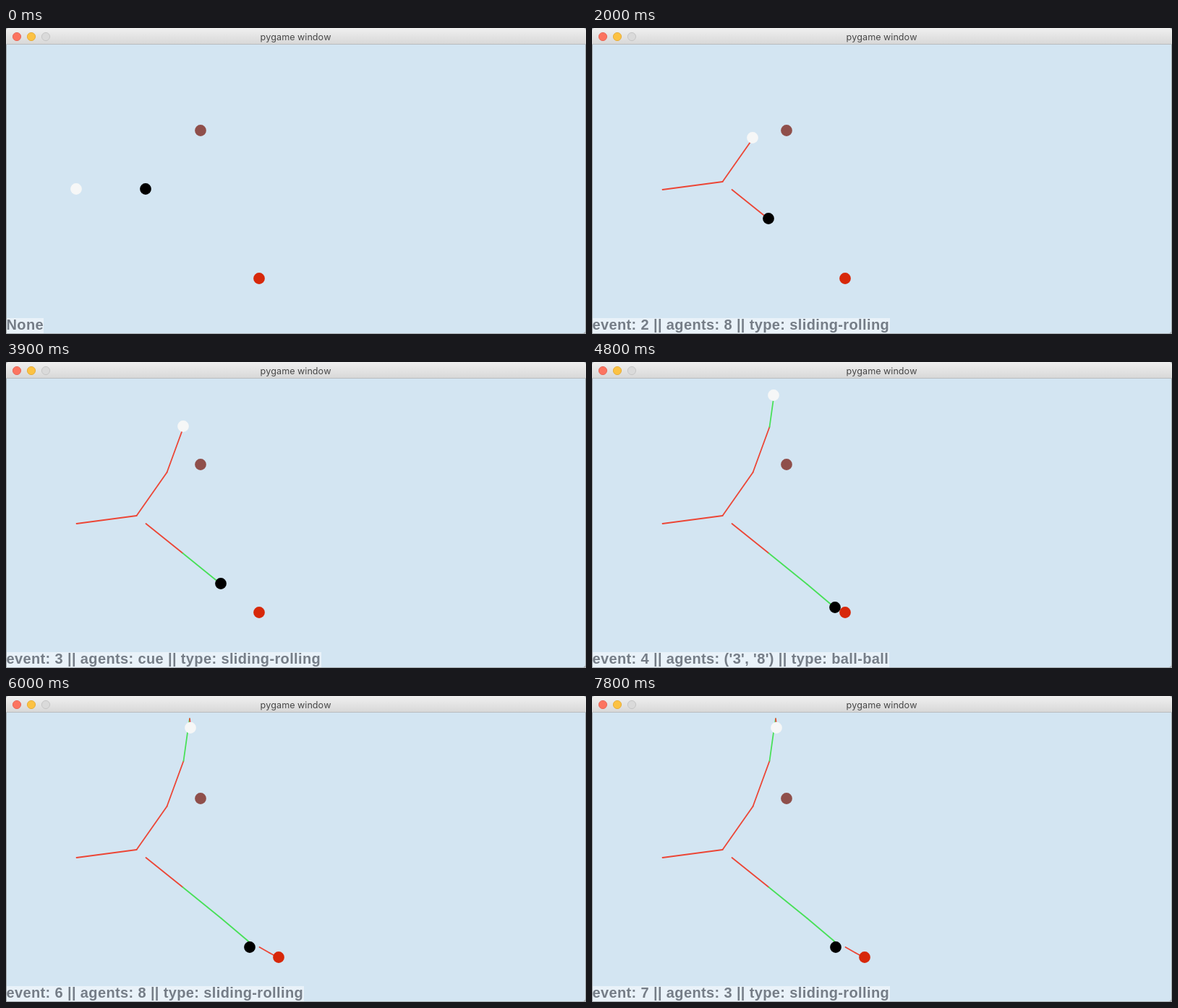
Animation of 802 by 424 pixels, one loop 8000 ms. Source, as an HTML page with a canvas:

```html
<!DOCTYPE html>
<html lang="en">
<head>
<meta charset="utf-8">
<title>pygame window</title>
<style>
  html, body { margin: 0; width: 100%; height: 100%; overflow: hidden; background: #a3a8ac; }
  canvas { display: block; }
</style>
</head>
<body>
<canvas width="802" height="424"></canvas>
<script>
const ctx = document.querySelector('canvas').getContext('2d');
const STEP = 1000, STEPS = 8;
const RED = '#ec4636', GREEN = '#48e058';

const captions = [
  'None',
  "event: 1 || agents: ('cue', '8') || type: ball-ball",
  'event: 2 || agents: 8 || type: sliding-rolling',
  'event: 3 || agents: cue || type: sliding-rolling',
  "event: 4 || agents: ('3', '8') || type: ball-ball",
  "event: 5 || agents: ('cue', 'T') || type: ball-rail",
  'event: 6 || agents: 8 || type: sliding-rolling',
  'event: 7 || agents: 3 || type: sliding-rolling',
];

// Each ball rests at path[0] until step `start`, then advances one point per step.
// `trail` gives the motion of each leg: s = sliding, r = rolling.
const balls = [
  { color: '#f6f7f7', start: 0, trail: 'sssrrs',
    path: [[97, 223], [180, 212], [222, 152], [245, 89], [251, 46], [253.5, 30.5], [255, 44]] },
  { color: '#000', start: 1, trail: 'srrss',
    path: [[193, 223], [244, 264], [297, 307], [336, 340], [336.5, 344], [337, 348]] },
  { color: '#d7280a', start: 4, trail: 'ss',
    path: [[350, 347], [364, 355], [377, 362]] },
  { color: '#8f4f4b', start: 0, trail: '', path: [[269, 142]] },
];

function disc(x, y, r, fill, stroke) {
  ctx.beginPath();
  ctx.arc(x, y, r, 0, 2 * Math.PI);
  ctx.fillStyle = fill;
  ctx.fill();
  if (stroke) {
    ctx.strokeStyle = stroke;
    ctx.lineWidth = 1;
    ctx.stroke();
  }
}

function drawWindow() {
  ctx.fillStyle = '#a3a8ac';
  ctx.fillRect(0, 0, 802, 424);
  ctx.beginPath();
  ctx.roundRect(1, 0, 800, 423, 4);
  ctx.fillStyle = '#d3e5f2';
  ctx.fill();

  const bar = ctx.createLinearGradient(0, 0, 0, 22);
  bar.addColorStop(0, '#f0f0f0');
  bar.addColorStop(1, '#d8d8d8');
  ctx.beginPath();
  ctx.roundRect(0, 0, 802, 22, [4, 4, 0, 0]);
  ctx.fillStyle = bar;
  ctx.fill();
  ctx.fillStyle = '#b9bcbe';
  ctx.fillRect(0, 22, 802, 1);

  disc(15, 12, 5.6, '#fc7460', '#e8695a');
  disc(35, 12, 5.6, '#fcc243', '#e6ae3c');
  disc(55, 12, 5.6, '#dadada', '#c6c6c6');

  ctx.font = '12.6px Inter, sans-serif';
  ctx.letterSpacing = '0px';
  ctx.textAlign = 'center';
  ctx.fillStyle = '#484848';
  ctx.fillText('pygame window', 400.5, 17);
}

function drawTrail({ path, start, trail }, step) {
  ctx.lineWidth = 1.8;
  ctx.lineCap = 'round';
  for (let i = 0; i < Math.min(step - start, trail.length); i++) {
    ctx.beginPath();
    ctx.moveTo(path[i][0] + 0.5, path[i][1] + 1);
    ctx.lineTo(path[i + 1][0] + 0.5, path[i + 1][1] + 1);
    ctx.strokeStyle = trail[i] === 's' ? RED : GREEN;
    ctx.stroke();
  }
}

function drawBall({ path, start, color }, step) {
  const leg = Math.max(0, Math.min(step - start, path.length - 1));
  disc(...path[leg], 7.9, color);
}

function drawCaption(text) {
  ctx.font = 'bold 20px "Liberation Sans", Arial, sans-serif';
  ctx.letterSpacing = '0.37px';
  ctx.fontKerning = 'none';
  ctx.textAlign = 'left';
  ctx.fillStyle = '#e9f2f9';
  ctx.fillRect(1, 402, Math.round(ctx.measureText(text).width), 21);
  ctx.fillStyle = '#757d87';
  ctx.fillText(text, 0.5, 418);
}

function frame() {
  const step = Math.floor(performance.now() / STEP) % STEPS;
  drawWindow();
  balls.forEach(ball => drawTrail(ball, step));
  balls.forEach(ball => drawBall(ball, step));
  drawCaption(captions[step]);
  requestAnimationFrame(frame);
}
frame();
</script>
</body>
</html>
```
